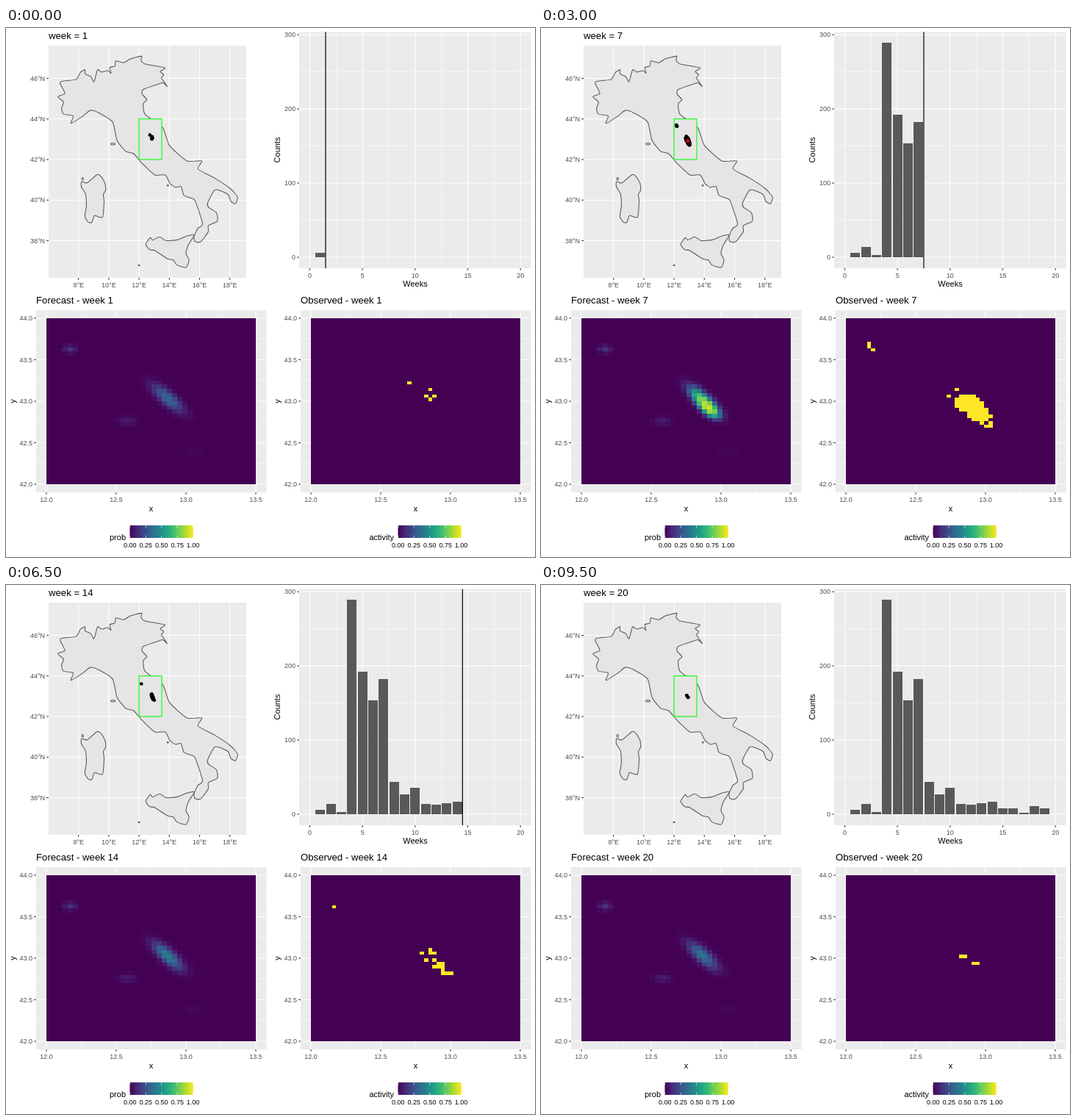
An HTML page with a canvas that plays this animation: 720 by 720 pixels, repeating every 10000 ms.

```html
<!DOCTYPE html>
<html lang="en">
<head>
<meta charset="utf-8">
<title>Weekly forecast</title>
<style>
html, body { margin: 0; width: 100%; height: 100%; overflow: hidden; background: #fff; }
canvas { display: block; width: 720px; height: 720px; }
</style>
</head>
<body>
<canvas id="stage" width="720" height="720"></canvas>
<script>
const ctx = document.getElementById('stage').getContext('2d');
const WEEKS = 20, STEP = 500;
const FONT = '"Liberation Sans", Arial, sans-serif';
const counts = [6, 14, 3, 289, 192, 154, 182, 44, 27, 36, 14, 13, 15, 17, 8, 8, 2, 11, 8];

// Key points of the outlines as "lon lat" pairs
const alps = `6.81 45.83 7.13 45.88 7.85 45.95 8.13 46.3 8.44 46.42 8.43 46.22 8.82 46.08 9.02 45.83
 9.26 46.42 9.52 46.31 9.94 46.38 10.15 46.25 10.06 46.53 10.4 46.6 10.47 46.86 11 46.77
 11.43 46.96 12.17 47.09 12.13 46.9 12.39 46.71 13.7 46.52 13.4 46.33 13.63 46.18 13.48 46.02
 13.86 45.6`;
const adriatic = `13.56 45.78 13.1 45.67 12.27 45.45 12.2 45.22 12.52 44.95 12.28 44.75 12.4 44.22
 13.56 43.57 14.01 42.69 15.17 41.93 16.15 41.93 15.9 41.53 17 41.08 18.04 40.56 18.51 40.14
 18.36 39.82 18.05 39.95 17.87 40.28 17.03 40.51 16.53 39.86 16.6 39.64 17.11 39.38 17.17 38.96
 16.58 38.74 16.57 38.43 16.06 37.94`;
const tyrrhenian = `15.68 37.97 15.64 38.21 15.88 38.61 16.2 38.83 15.76 39.87 15.59 40.06 14.97 40.23
 14.77 40.67 14.4 40.63 14.04 40.82 13.73 41.24 13.04 41.24 12.2 41.81 11.64 42.29 11.12 42.4
 10.54 42.95 10.25 43.85 9.29 44.32 8.77 44.42 8.29 44.14 7.5 43.78 7.65 44.15 7 44.24
 6.88 44.52 7.01 44.83 6.63 45.1 7.1 45.25 6.8 45.72`;
const sardinia = `8.19 40.65 8.2 40.91 8.57 40.85 9.23 41.26 9.5 41.15 9.75 40.83 9.8 40.5 9.64 40.27
 9.69 39.93 9.58 39.15 9.06 39.24 8.88 38.9 8.65 38.91 8.42 39.2 8.52 39.7 8.47 40.29`;
const sicily = `15.65 38.28 15.18 38.23 14.51 38.04 13.79 38 13.36 38.19 12.9 38.03 12.74 38.15
 12.44 37.82 12.7 37.56 13.04 37.51 13.9 37.1 14.26 37.05 14.5 36.8 15.11 36.68 15.3 37.06
 15.1 37.36 15.24 37.77`;
const islets = [[10.28, 42.77, 3, 1.2], [8.27, 41.05, 1.2, 1.8], [13.9, 40.72, 1, 0.7], [12, 36.79, 1, 0.7]];

// The fault zone, positions in pixels of the 285 by 226 field
const FIELD = { x: 14, y: 395, w: 285, h: 226 };
const TILT = 0.7;
const fieldX = lon => (lon - 12) * 190;
const fieldY = lat => (44 - lat) * 113;
const shocks = [[4, 12.84, 43.05], [5, 12.84, 43.05], [7, 12.91, 42.92]]
  .map(([week, lon, lat]) => ({ week, lon, lat, x: fieldX(lon), y: fieldY(lat) }));
const swarm = { x: 32, y: 42 };

// Background rate: x, y, height, length, width, angle
const steady = [
  [165, 109, 0.42, 17, 5.8, TILT], [swarm.x, swarm.y, 0.18, 5.5, 3.5, 0],
  [110, 140, 0.09, 8, 4, 0], [200, 182, 0.02, 10, 5, 0]
];

const viridis = ['440154', '482878', '3e4989', '31688e', '26828e', '1f9e89', '35b779', '6ece58', 'b5de2b', 'fde725']
  .map(h => [0, 2, 4].map(i => parseInt(h.slice(i, i + 2), 16)));

function shade(v) {
  const t = Math.max(0, Math.min(1, v)) * 9, i = Math.min(8, Math.floor(t));
  return `rgb(${viridis[i].map((c, k) => Math.round(c + (viridis[i + 1][k] - c) * (t - i)))})`;
}

function random(seed) {
  return () => {
    seed = (seed * 1664525 + 1013904223) >>> 0;
    return seed / 4294967296;
  };
}

// Events scatter around the latest main shock, a few around the side swarm
function eventsOf(week) {
  const rnd = random(week * 7919 + 5);
  const bell = () => (rnd() + rnd() + rnd() + rnd() - 2) * 1.7;
  const centre = shocks.filter(s => s.week <= week).pop() || shocks[0];
  return Array.from({ length: counts[week - 1] || 4 }, () => {
    const side = rnd() < 0.06;
    const u = bell() * (side ? 5 : 13), v = bell() * (side ? 4 : 5.5);
    const { x, y } = side ? swarm : centre;
    return [x + u * Math.cos(TILT) - v * Math.sin(TILT), y + u * Math.sin(TILT) + v * Math.cos(TILT)];
  });
}

function gauss(x, y, [bx, by, rate, along, across, angle]) {
  const dx = x - bx, dy = y - by, c = Math.cos(angle), s = Math.sin(angle);
  return rate * Math.exp(-(((dx * c + dy * s) / along) ** 2 + ((dy * c - dx * s) / across) ** 2) / 2);
}

const lonX = lon => 98.7 + (lon - 8) * 20.6;
const latY = lat => 68.5 + (46 - lat) * 27.62;
const weekX = w => 413.5 + w * 14.335;
const countY = n => 312 - n * 1.0095;

function rect(x, y, w, h, color) {
  ctx.fillStyle = color;
  ctx.fillRect(x, y, w, h);
}

// Rectangle with its edges on whole pixels
function block(x, y, w, h, color) {
  const l = Math.round(x), t = Math.round(y);
  rect(l, t, Math.round(x + w) - l, Math.round(y + h) - t, color);
}

function line(x1, y1, x2, y2, color, width = 1.07) {
  ctx.strokeStyle = color;
  ctx.lineWidth = width;
  ctx.beginPath();
  ctx.moveTo(x1, y1);
  ctx.lineTo(x2, y2);
  ctx.stroke();
}

function text(s, x, y, size = 9, align = 'center', color = '#4d4d4d') {
  ctx.font = `${size}px ${FONT}`;
  ctx.textAlign = align;
  ctx.fillStyle = color;
  ctx.fillText(s, x, y);
}

const title = (s, x, y) => text(s, x, y, 13.2, 'left', '#000');

function upright(s, x, y) {
  ctx.save();
  ctx.translate(x, y);
  ctx.rotate(-Math.PI / 2);
  text(s, 0, 0, 11, 'center', '#000');
  ctx.restore();
}

// Grey panel with grid, ticks and labels; each axis is a list of [position, label]
function panel(x, y, r, b, xs, ys, minorX = [], minorY = []) {
  rect(x, y, r - x, b - y, '#ebebeb');
  for (const p of minorX) line(p, y, p, b, '#fff', 0.53);
  for (const p of minorY) line(x, p, r, p, '#fff', 0.53);
  for (const [p, label] of xs) {
    line(p, y, p, b, '#fff');
    line(p, b, p, b + 2.75, '#333');
    text(label, p, b + 12.5);
  }
  for (const [p, label] of ys) {
    line(x, p, r, p, '#fff');
    line(x - 2.75, p, x, p, '#333');
    text(label, x - 5, p + 3.2, 9, 'right');
  }
}

function paintLand() {
  ctx.fillStyle = '#e5e5e5';
  ctx.fill();
  ctx.strokeStyle = '#595959';
  ctx.lineWidth = 1.07;
  ctx.stroke();
}

// Closed curve through the key points, slightly rounded at each
function land(points) {
  const v = points.trim().split(/\s+/).map(Number), n = v.length / 2;
  const at = i => {
    const k = (i + n) % n;
    return [lonX(v[2 * k]), latY(v[2 * k + 1])];
  };
  ctx.beginPath();
  ctx.moveTo(...at(0));
  for (let i = 0; i < n; i++) {
    const [a, b, c, d] = [at(i - 1), at(i), at(i + 1), at(i + 2)];
    ctx.bezierCurveTo(b[0] + (c[0] - a[0]) / 10, b[1] + (c[1] - a[1]) / 10,
      c[0] - (d[0] - b[0]) / 10, c[1] - (d[1] - b[1]) / 10, ...c);
  }
  ctx.closePath();
  paintLand();
}

function drawMap(week, events) {
  panel(58, 24, 327, 340,
    [8, 10, 12, 14, 16, 18].map(v => [lonX(v), v + '°E']),
    [38, 40, 42, 44, 46].map(v => [latY(v), v + '°N']));
  [alps + ' ' + adriatic + ' ' + tyrrhenian, sardinia, sicily].forEach(land);
  for (const [lon, lat, rx, ry] of islets) {
    ctx.beginPath();
    ctx.ellipse(lonX(lon), latY(lat), rx, ry, 0, 0, 7);
    paintLand();
  }
  rect(lonX(12), latY(44), 30.9, 55.24, '#e5e5e5');
  ctx.strokeStyle = '#0f0';
  ctx.strokeRect(lonX(12), latY(44), 30.9, 55.24);
  for (const [x, y] of events) {
    ctx.beginPath();
    ctx.arc(lonX(12 + x / 190), latY(44 - y / 113), 2.3, 0, 7);
    ctx.fillStyle = '#000';
    ctx.fill();
  }
  for (const s of shocks.filter(s => s.week === week)) {
    const x = lonX(s.lon), y = latY(s.lat);
    ctx.beginPath();
    ctx.moveTo(x, y - 3.6);
    ctx.lineTo(x + 3.2, y + 1.9);
    ctx.lineTo(x - 3.2, y + 1.9);
    ctx.fillStyle = '#f00';
    ctx.fill();
  }
  title('week = ' + week, 58, 15);
}

function drawCounts(week) {
  panel(399, 5.5, 714.5, 327,
    [0, 5, 10, 15, 20].map(v => [weekX(v), v]),
    [0, 100, 200, 300].map(v => [countY(v), v]),
    [2.5, 7.5, 12.5, 17.5].map(weekX), [50, 150, 250].map(countY));
  counts.slice(0, week).forEach((n, i) => {
    block(weekX(i + 0.55), countY(n), 12.9, 312 - countY(n), '#595959');
  });
  if (week < WEEKS) line(weekX(week + 0.5), 5.5, weekX(week + 0.5), 327, '#000', 1.2);
  text('Weeks', 557, 352, 11, 'center', '#000');
  upright('Counts', 373, 166);
}

function drawField(x, heading, legend, barX) {
  const px = v => x + FIELD.x + fieldX(v), py = v => FIELD.y + fieldY(v);
  panel(x, 384, x + 313.5, 632,
    [12, 12.5, 13, 13.5].map(v => [px(v), v.toFixed(1)]),
    [42, 42.5, 43, 43.5, 44].map(v => [py(v), v.toFixed(1)]),
    [12.25, 12.75, 13.25].map(px), [42.25, 42.75, 43.25, 43.75].map(py));
  rect(x + FIELD.x, FIELD.y, FIELD.w, FIELD.h, shade(0));
  title(heading, x, 375);
  text('x', x + 156.5, 658, 11, 'center', '#000');
  upright('y', x - 28, 508);

  const g = ctx.createLinearGradient(barX, 0, barX + 86.4, 0);
  for (let i = 0; i < 10; i++) g.addColorStop(i / 9, shade(i / 9));
  rect(barX, 677, 86.4, 17, g);
  for (let i = 0; i < 5; i++) {
    const p = barX + 0.3 + i * 21.45;
    line(p, 677, p, 680.4, '#fff', 0.6);
    line(p, 690.6, p, 694, '#fff', 0.6);
    text((i / 4).toFixed(2), p, 707, 9, 'center', '#000');
  }
  text(legend, barX - 5.5, 697, 11, 'right', '#000');
}

function drawForecast(week) {
  drawField(41, 'Forecast - week ' + week, 'prob', 168.5);
  // Each main shock raises the rate, which then fades week by week
  const after = shocks.filter(s => s.week <= week)
    .map(s => [s.x, s.y, 2.4 / (1 + week - s.week) ** 1.5, 10, 4.8, TILT]);
  const all = steady.concat(after);
  const n = 40, w = FIELD.w / n, h = FIELD.h / n;
  for (let r = 0; r < n; r++) {
    for (let c = 0; c < n; c++) {
      const rate = all.reduce((sum, b) => sum + gauss((c + 0.5) * w, (r + 0.5) * h, b), 0);
      if (rate > 0.006) block(55 + c * w, FIELD.y + r * h, w, h, shade(1 - Math.exp(-rate)));
    }
  }
}

function drawObserved(week, events) {
  drawField(401, 'Observed - week ' + week, 'activity', 533.5);
  const w = FIELD.w / 50, h = FIELD.h / 50;
  for (const [x, y] of events) {
    block(415 + Math.floor(x / w) * w, FIELD.y + Math.floor(y / h) * h, w, h, shade(1));
  }
}

let shown = 0;
function tick() {
  const week = Math.floor((performance.now() - start) / STEP) % WEEKS + 1;
  if (week !== shown) {
    shown = week;
    const events = eventsOf(week);
    rect(0, 0, 720, 720, '#fff');
    drawMap(week, events);
    drawCounts(week);
    drawForecast(week);
    drawObserved(week, events);
  }
  requestAnimationFrame(tick);
}
const start = performance.now();
tick();
</script>
</body>
</html>
```
